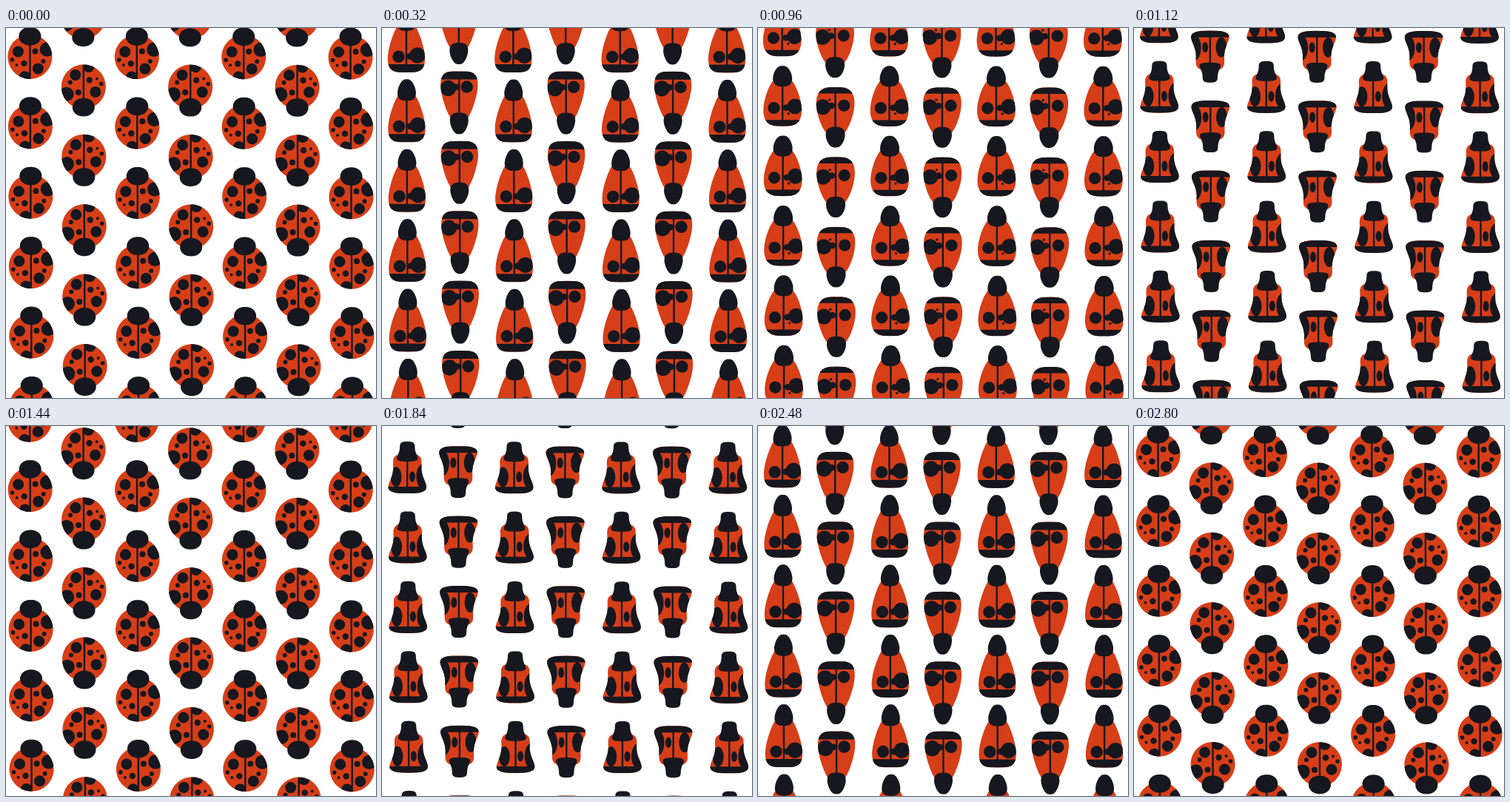
An HTML page with a canvas for the animation above (2880 ms loop, 500 by 500 pixels).

```html
<!DOCTYPE html>
<html>
<head>
<meta charset="utf-8">
<style>
  html, body { margin: 0; width: 100%; height: 100%; overflow: hidden; background: #fff; }
  canvas { display: block; width: 500px; height: 500px; }
</style>
</head>
<body>
<canvas id="stage" width="500" height="500"></canvas>
<script>
const ctx = document.getElementById('stage').getContext('2d');
const RED = '#d63e18', BLACK = '#16171f', TAU = Math.PI * 2;
const LOOP = 2880, STEP = 80, LEAP = 720;
const PITCH = 94.4, STRIDE = PITCH / 4, COLUMN = 72.2;

// mid, half: vertical extent; wide: half width; taper: widens downwards;
// power: below 1 is boxier; wave: shoulders and waist.
const rest = {
  rise: 0, lean: 0, band: 0, dots: 1,
  head: { mid: -27.7, half: 12.3, wide: 15, taper: 0, power: 0.9, wave: 0 },
  body: { mid: 0, half: 30, wide: 30, taper: 0, power: 1, wave: 0 },
  warp: { drop: 0, x: 1, y: 1, rx: 1, ry: 1 }
};
const stretched = {
  rise: 0, lean: 0.5, band: 11, dots: 0,
  head: { mid: -49.5, half: 14.5, wide: 12, taper: 0.25, power: 0.7, wave: 0 },
  body: { mid: -13, half: 34, wide: 23, taper: 0.35, power: 0.5, wave: 0 },
  warp: { drop: 4, x: 0.65, y: 0.6, rx: 1.1, ry: 1.1 }
};
const landing = {
  rise: STRIDE, lean: 1.6, band: 9, dots: 0,
  head: { mid: -28, half: 13.5, wide: 13, taper: 0.3, power: 0.6, wave: 2 },
  body: { mid: 1.6, half: 27, wide: 24, taper: 0.25, power: 0.6, wave: 4 },
  warp: { drop: 7.6, x: 0.95, y: 0.2, rx: 1, ry: 1.8 }
};
const arrived = { ...rest, rise: STRIDE };
const keys = [[60, rest], [320, stretched], [400, landing], [610, arrived]];

// x, y, radius on the resting body. Large spots warp, the others fade.
const spots = [[-16, -7, 7.5], [23, -10, 9.7], [7, -7.5, 4]];
const dots = [[11, 16, 7.5], [-7, 27, 7.7], [-8, 9, 4.2], [18, 6, 3], [-24, 4, 2.8], [-18, 11, 2]];

const smooth = u => u * u * (3 - 2 * u);

function mix(a, b, u) {
  if (typeof a === 'number') return a + (b - a) * u;
  return Object.fromEntries(Object.keys(a).map(k => [k, mix(a[k], b[k], u)]));
}

function poseAt(phase) {
  const next = keys.findIndex(([time]) => phase <= time);
  if (next === 0) return rest;
  if (next < 0) return arrived;
  const [t0, a] = keys[next - 1], [t1, b] = keys[next];
  return mix(a, b, smooth((phase - t0) / (t1 - t0)));
}

function outline({ mid, half, wide, taper, power, wave }) {
  const path = new Path2D(), count = 72;
  for (let i = 0; i < count; i++) {
    const angle = i / count * TAU, s = Math.sin(angle), c = Math.cos(angle);
    const swell = wide * Math.abs(s) ** power * (1 - taper * c);
    path.lineTo(Math.sign(s) * swell + wave * Math.sin(3 * angle), mid - half * c);
  }
  path.closePath();
  return path;
}

function markings({ body, warp, band, dots: size }) {
  const path = new Path2D();
  const add = (x, y, rx, ry) => {
    path.moveTo(x + rx, y);
    path.ellipse(x, y, rx, ry, 0, 0, TAU);
  };
  for (const [x, y, r] of spots) add(x * warp.x, warp.drop + y * warp.y, r * warp.rx, r * warp.ry);
  for (const [x, y, r] of dots) add(x * warp.x, body.mid + y, r * size, r * size);
  path.rect(-1.2, body.mid - body.half, 2.4, body.half * 2);
  path.rect(-body.wide * 2, body.mid + body.half - band, body.wide * 4, band);
  return path;
}

function drawBug(x, y, turned, pose, shapes) {
  ctx.save();
  ctx.translate(x, y);
  if (turned) ctx.rotate(Math.PI);
  ctx.translate(pose.lean, -pose.rise);
  ctx.fillStyle = RED;
  ctx.fill(shapes.body);
  ctx.fillStyle = BLACK;
  ctx.save();
  ctx.clip(shapes.body);
  ctx.fill(shapes.marks);
  ctx.restore();
  ctx.fill(shapes.head);
  ctx.restore();
}

function render(time) {
  const t = Math.floor((time % LOOP) / STEP) * STEP;
  const travel = Math.floor(t / LEAP) * STRIDE;
  const pose = poseAt(t % LEAP);
  const shapes = { head: outline(pose.head), body: outline(pose.body), marks: markings(pose) };
  ctx.fillStyle = '#fff';
  ctx.fillRect(0, 0, 500, 500);
  for (let col = 0; col < 7; col++) {
    const turned = col % 2 === 1;
    const start = turned ? 79.3 + travel : 38.9 - travel;
    for (let row = -2; row < 8; row++) {
      const y = start + row * PITCH + col * 0.1;
      drawBug(32.2 + col * COLUMN + y * 0.005, y, turned, pose, shapes);
    }
  }
}

const began = performance.now();
function tick() {
  render(performance.now() - began);
  requestAnimationFrame(tick);
}
tick();
</script>
</body>
</html>
```
